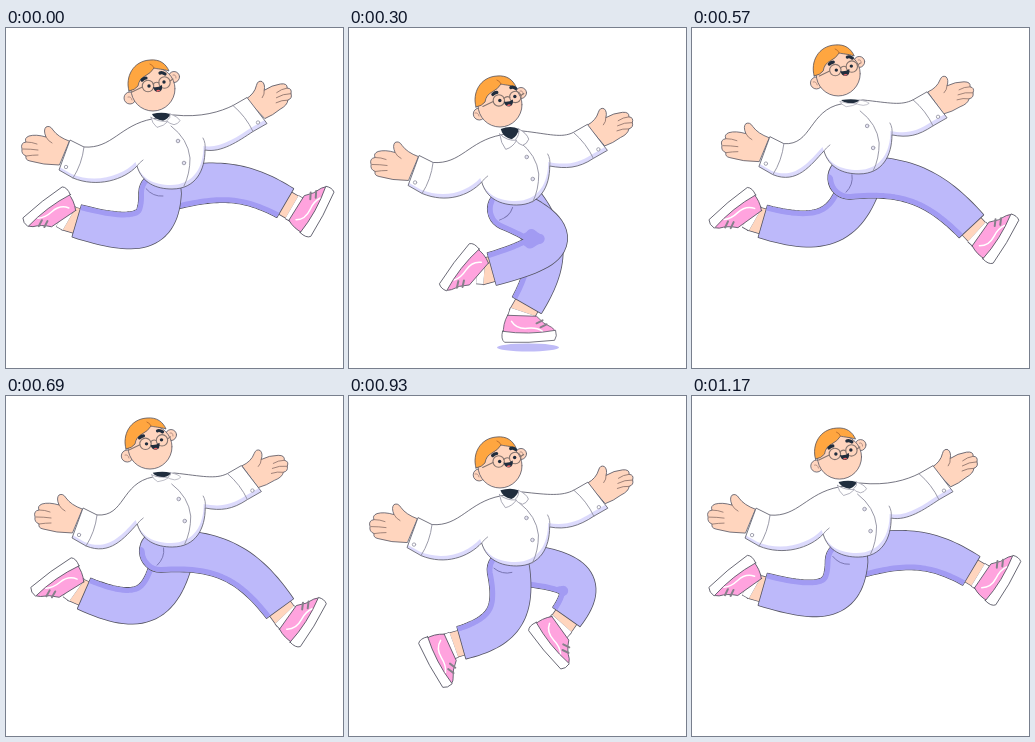
An HTML page with a canvas for the animation above (1.2 s loop, 337 by 340 pixels).

```html
<!DOCTYPE html>
<html lang="en">
<head>
<meta charset="utf-8">
<title>Running man</title>
<style>
html, body { margin: 0; width: 100%; height: 100%; overflow: hidden; background: #fff; }
canvas { display: block; width: 337px; height: 340px; }
</style>
</head>
<body>
<canvas id="stage"></canvas>
<script>
const W = 337, H = 340, LOOP = 1200, STEP = 30, TURN = Math.PI * 2;
const INK = '#555563', LINE = '#8f8f9f', SKIN = '#ffd5be', HAIR = '#ffa640';
const PANTS = '#bdb9fa', SHADE = '#a29bf3', LILAC = '#dcdafc', PINK = '#ffa3de', DARK = '#202d3d';

const canvas = document.getElementById('stage');
const dpr = window.devicePixelRatio || 1;
canvas.width = W * dpr;
canvas.height = H * dpr;
const g = canvas.getContext('2d');
g.lineJoin = g.lineCap = 'round';

// One stride, shared by both legs: phase, knee x y, ankle x y, foot angle
const STRIDE = [
  [0, 153, 217, 71, 193, 144],
  [105, 155, 231, 79, 198, 146],
  [275, 236, 215, 143, 241, 129],
  [354, 248, 178, 217, 221, 53],
  [432, 229, 149, 261, 198, -13],
  [600, 231, 147, 279, 175, -60],
  [705, 230, 153, 273, 192, -56],
  [875, 210, 221, 178, 277, 0],
  [954, 169, 231, 113, 247, 63],
  [1032, 151, 228, 87, 212, 116]
];
// Bounce of the body: phase, neck y, head x
const BOUNCE = [
  [0, 88, 147], [105, 90, 145], [275, 104, 151], [432, 80, 150],
  [701, 78, 144], [875, 102, 150], [954, 97, 151]
];

// Smooth cyclic curve through the rows of a table
function pose(keys, time) {
  const n = keys.length, t = time % LOOP;
  const at = i => {
    const wrap = Math.floor(i / n), [k, ...rest] = keys[i - wrap * n];
    return [k + wrap * LOOP, ...rest];
  };
  let i = n - 1;
  while (keys[i][0] > t) i--;
  const [a, b, c, d] = [-1, 0, 1, 2].map(j => at(i + j));
  const h0 = b[0] - a[0], h = c[0] - b[0], h2 = d[0] - c[0], u = (t - b[0]) / h, v = 1 - u;
  return b.slice(1).map((p, j) => {
    const k = j + 1, s = (c[k] - p) / h;
    const m0 = ((p - a[k]) / h0 * h + s * h0) / (h0 + h);
    const m1 = (s * h2 + (d[k] - c[k]) / h2 * h) / (h + h2);
    return p * v * v * (1 + 2 * u) + c[k] * u * u * (3 - 2 * u) + h * u * v * (m0 * v - m1 * u);
  });
}

function paint(path, fill, line = INK, width = .8) {
  const p = typeof path === 'string' ? new Path2D(path) : path;
  if (fill) { g.fillStyle = fill; g.fill(p); }
  if (line) { g.strokeStyle = line; g.lineWidth = width; g.stroke(p); }
}
function dot(x, y, r, fill, line, width) {
  const p = new Path2D();
  p.arc(x, y, r, 0, TURN);
  paint(p, fill, line, width);
}
function placed(x, y, angle, draw) {
  g.save();
  g.translate(x, y);
  g.rotate(angle);
  draw();
  g.restore();
}
function tube(x0, y0, x1, y1, w, fill) {
  const p = new Path2D();
  p.moveTo(x0, y0);
  p.lineTo(x1, y1);
  g.lineCap = 'butt';
  paint(p, null, INK, w + 1.4);
  paint(p, null, fill, w);
  g.lineCap = 'round';
}

function shoe() {
  g.translate(4, 0);
  paint('M-17 -1L12 0Q19 8 27 11Q31 13 31 18L-21 18Q-22 8 -17 -1Z', PINK);
  paint('M-13 5Q-8 13 3 12Q12 11 18 15', null, '#fff', 1.5);
  paint('M12 7L18 4M16 11L22 8', null, '#85808a', 2);
  paint('M-22 15Q4 19 31 14Q33 20 30 24Q4 27 -20 26Q-24 23 -22 15Z', '#fff');
}

function leg(hx, hy, [kx, ky, ax, ay, deg], crease) {
  const mix = (a, b) => a + (b - a) * .75;
  const cx = [hx, mix(hx, kx), mix(ax, kx), ax], cy = [hy, mix(hy, ky), mix(ay, ky), ay];
  const bez = ([a, b, c, d], t) => {
    const s = 1 - t;
    return s * s * s * a + 3 * s * s * t * b + 3 * s * t * t * c + t * t * t * d;
  };
  const heading = t => {
    const slope = ([a, b, c, d]) => (1 - t) ** 2 * (b - a) + 2 * t * (1 - t) * (c - b) + t * t * (d - c);
    return Math.atan2(slope(cy), slope(cx));
  };
  const back = [], front = [], n = 32, e = 1 / n / 2;
  for (let i = 0; i <= n; i++) {
    const t = i / n, x = bez(cx, t), y = bez(cy, t), a = heading(t), r = 21 - 4.5 * t;
    const bend = Math.sin(heading(t + e) - heading(t - e));
    const len = Math.hypot(bez(cx, t + e) - bez(cx, t - e), bez(cy, t + e) - bez(cy, t - e));
    // the inside of the bend may not fold over itself
    const inner = bend > 0 ? Math.min(r, len / bend) : r;
    back.push([x - Math.sin(a) * inner, y + Math.cos(a) * inner]);
    front.unshift([x + Math.sin(a) * r, y - Math.cos(a) * r]);
  }
  const top = heading(0), end = heading(1), foot = deg * Math.PI / 180;
  const dx = Math.cos(end), dy = Math.sin(end), fx = ax + dx * 13, fy = ay + dy * 13;

  tube(ax - dx * 3, ay - dy * 3, fx, fy, 25, SKIN);
  tube(fx - dx * 5, fy - dy * 5, fx - Math.sin(foot) * 3, fy + Math.cos(foot) * 3, 26, '#fff');
  placed(fx, fy, foot, shoe);

  const shape = new Path2D(), edge = new Path2D();
  [...back, ...front].forEach(p => shape.lineTo(...p));
  shape.arc(hx, hy, 21, top - Math.PI / 2, top + Math.PI / 2, true);
  shape.closePath();
  edge.arc(hx, hy, 21, top - Math.PI, top + Math.PI / 2, true);
  back.forEach(p => edge.lineTo(...p));
  paint(shape, null, INK, 1.6);
  paint(shape, PANTS, null);
  g.save();
  g.clip(shape);
  paint(edge, null, SHADE, 10);
  g.restore();
  if (crease) placed(hx, hy, top - Math.PI / 2, () => paint('M-14 -4Q-7 4 3 3', null, '#7571ad', .9));
}

function leftHand(x, y) {
  placed(x, y, 0, () => {
    paint('M4 -14Q-7 -18 -12 -25Q-15 -30 -19 -28Q-22 -25 -19 -18Q-29 -21 -36 -19Q-41 -17 -39 -13'
      + 'Q-45 -12 -43 -6Q-44 -1 -39 1Q-40 5 -35 6Q-22 10 -6 10Z', SKIN);
    paint('M-39 -13Q-33 -13 -28 -11M-42 -6Q-34 -6 -27 -5M-39 1Q-32 0 -27 0M-19 -18Q-17 -14 -13 -12',
      null, '#8a6f68', .8);
  });
}
function rightHand(x, y, angle) {
  placed(x, y, angle, () => {
    paint('M-9 -13Q0 -17 3 -25Q5 -30 9 -28Q12 -25 10 -19Q18 -23 27 -23Q34 -23 33 -18'
      + 'Q38 -17 36 -12Q37 -7 32 -6Q31 -1 23 2Q15 7 7 9Z', SKIN);
    paint('M33 -18Q27 -18 22 -15M36 -12Q28 -13 21 -10M32 -6Q26 -7 20 -5M10 -19Q10 -15 7 -12',
      null, '#8a6f68', .8);
  });
}

function shirt(nx, ny, lx, ly, rx, ry) {
  const bx = 165 + (nx - 154) * .3;
  const p = new Path2D();
  p.moveTo(nx - 8, ny + 3);
  p.bezierCurveTo(nx - 40, ny + 9, lx + 47, ly - 6, lx + 19, ly - 8);
  p.lineTo(lx + 5, ly - 15);
  p.lineTo(lx - 6, ly + 15);
  p.lineTo(lx + 8, ly + 23);
  p.bezierCurveTo(lx + 32, ly + 33, bx - 47, ny + 64, bx - 34, ny + 50);
  p.bezierCurveTo(bx - 29, ny + 67, bx - 15, ny + 73, bx + 1, ny + 73);
  p.bezierCurveTo(bx + 25, ny + 73, bx + 34, ny + 54, bx + 34, ny + 34);
  p.bezierCurveTo(bx + 50, ny + 37, rx - 19, ry + 31, rx - 4, ry + 21);
  p.lineTo(rx + 10, ry + 13);
  p.lineTo(rx - 10, ry - 13);
  p.lineTo(rx - 24, ry - 5);
  p.bezierCurveTo(rx - 36, ry + 1, nx + 41, ny + 2, nx + 14, ny - 1);
  p.closePath();
  g.save();
  g.clip(p);
  paint(p, LILAC, null);
  g.translate(-1.5, -4);
  paint(p, '#fff', null);
  g.restore();
  paint(p);

  placed(lx, ly, 0, () => {
    paint('M19 -8Q17 9 8 23', null, LINE, .9);
    dot(1, 12, 1.7, '#fff', LINE);
  });
  placed(rx, ry, 0, () => {
    paint('M-24 -5Q-11 6 -4 21', null, LINE, .9);
    dot(1, 12, 1.7, '#fff', LINE);
  });
  placed(nx, ny, 0, () => {
    paint('M11 10Q28 23 30 42Q30 58 24 70', null, LINE, .9);
    dot(18, 25, 1.8, '#e4e3f2', LINE);
    dot(24, 47, 1.8, '#e4e3f2', LINE);
  });
  placed(bx, ny, 0, () => paint('M-34 50Q-32 47 -28 44M34 34Q35 27 32 22', null, LINE, .9));
}

// The collar flattens as the chest tips forward in the air
function collar(x, y) {
  g.save();
  g.translate(x, y);
  g.scale(1, .45 + (y - 78) * .022);
  paint('M-8 -3Q2 -7 10 -3Q9 4 3 7Q-6 5 -8 -3Z', DARK, null);
  paint('M-9 2Q-8 11 -3 17Q4 15 8 8Q-2 9 -9 2Z', '#fff', LINE);
  paint('M10 -3Q18 1 20 7Q18 12 14 13Q8 11 7 7Q11 3 10 -3Z', '#fff', LINE);
  g.restore();
}

function head(x, y, look) {
  placed(x, y, 0, () => {
    dot(-23 + look * .6, 12, 6, SKIN, INK);
    dot(21, -9, 5.5, SKIN, INK);
    dot(0, 3, 22, SKIN, INK);
    paint('M-24 5C-28 -9 -20 -25 -3 -26C7 -27 13 -22 16 -15C10 -17 4 -17 1 -18Q-2 -13 -8 -10'
      + 'Q-14 -7 -15 0Q-18 4 -24 5Z', HAIR);
    paint('M1 -18Q0 -21 -3 -22', null, '#b8692a', .9);
    paint('M-25 11Q-22 10 -21 14M20 -11Q23 -12 23 -8', null, '#a7837a', .8);
    g.translate(look, -look * .4);
    paint('M-11 -6Q-9 -8 -7 -8M7 -13Q9 -14 12 -12', null, DARK, 3.2);
    const frame = '#85746e';
    dot(-5, 0, 5.7, null, frame, 1.1);
    dot(11.5, -3.5, 5.7, null, frame, 1.1);
    paint('M0 -2Q3 -5 6 -3M-10.6 1L-21 6M17 -5L20 -7', null, frame, 1.1);
    dot(-4, 0, 1.7, DARK, null);
    dot(11, -4, 1.7, DARK, null);
    paint('M0 1Q5 2 9 -1Q10 5 5.5 6Q1 6 0 1Z', DARK, null);
    paint('M3 5Q5 3 7.5 4.5Q5 6.5 3 5Z', '#ee6a6a', null);
  });
}

function shadow([, , ax, ay]) {
  const k = Math.min(1, (ay - 250) / 26);
  if (k <= 0) return;
  g.fillStyle = '#bfbbf7';
  g.beginPath();
  g.ellipse(ax + 1, 319.5, 31 * k, 4 * k, 0, 0, TURN);
  g.fill();
}

function render(t) {
  // the second leap is a little shorter than the first
  const phase = t - 25 * Math.sin(TURN * t / LOOP);
  const sway = Math.cos(TURN * phase / LOOP);
  const [ny, hx] = pose(BOUNCE, phase);
  const nx = hx + 9 - 2 * sway, dip = ny - 88;
  const near = pose(STRIDE, phase), far = pose(STRIDE, phase + LOOP / 2);
  // the near leg reaches lower in front
  near[3] += Math.max(0, near[2] - 200) * .29;
  const lx = 66 - 7 * sway, ly = ny + 43 - 4 * sway - dip * .25;
  const rx = 248 + 3 * sway, ry = ny + 1.5 - 7 * sway + dip * .3;

  g.setTransform(dpr, 0, 0, dpr, 0, 0);
  g.fillStyle = '#fff';
  g.fillRect(0, 0, W, H);
  shadow(near);
  shadow(far);
  leg(nx + 14, ny + 72, far, false);
  leg(nx, ny + 77, near, true);
  leftHand(lx, ly);
  rightHand(rx, ry, -.07 * (1 + sway));
  shirt(nx, ny, lx, ly, rx, ry);
  collar(nx, ny);
  head(hx, ny - 30, (nx - 154) * .67);
}

function tick() {
  const t = performance.now() % LOOP;
  render(Math.floor(t / STEP) * STEP);
  requestAnimationFrame(tick);
}
tick();
</script>
</body>
</html>
```
